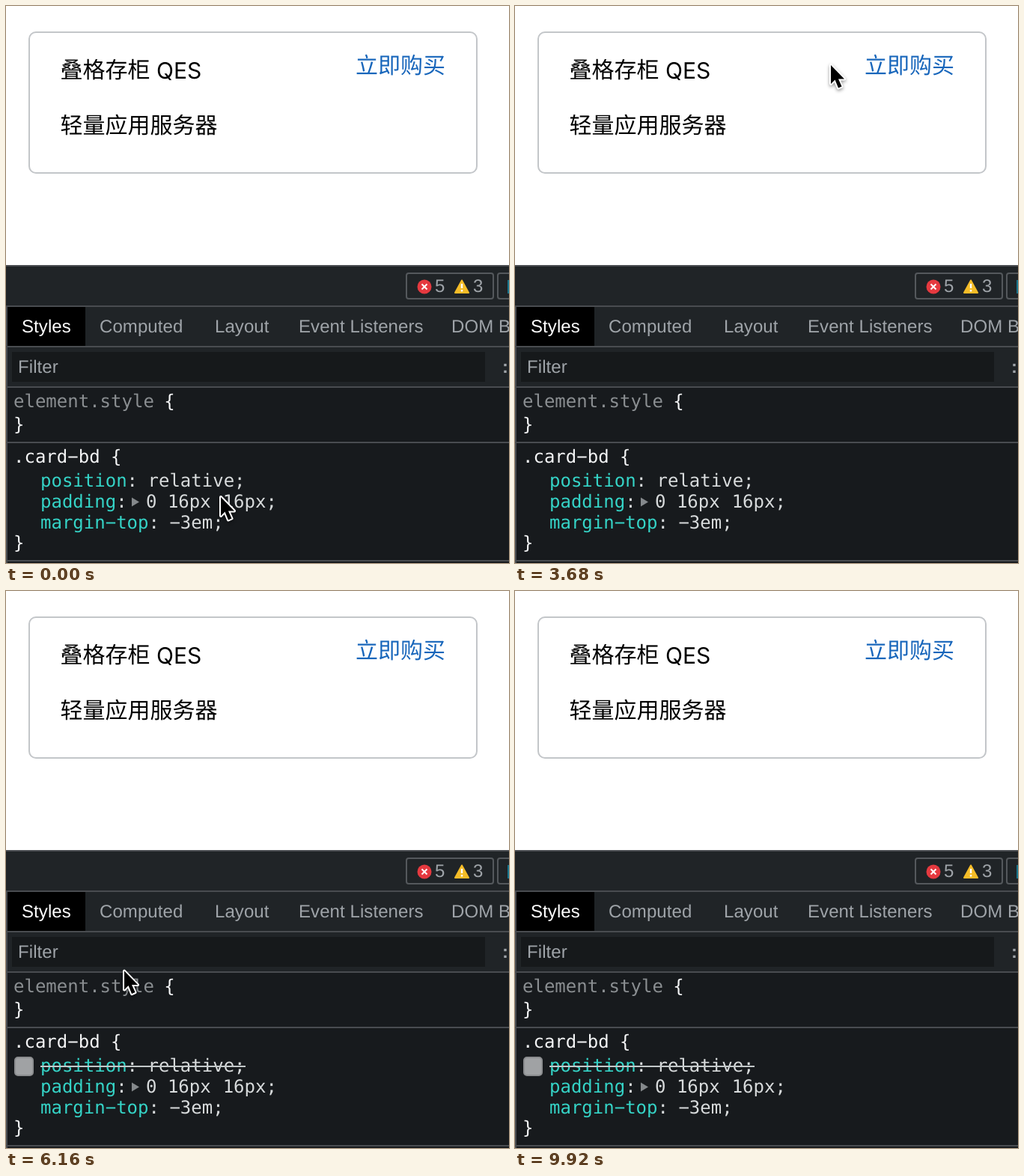
Recreate the animation shown at these times as an HTML page. Size 672x744 px, loop 10 s.

```html
<!DOCTYPE html>
<html lang="zh-CN">
<head>
<meta charset="utf-8">
<title>Card and style inspector</title>
<style>
  html, body { margin: 0; width: 100%; height: 100%; overflow: hidden; background: #fff; }
  svg { display: block; text-rendering: geometricPrecision; }
  .page { font: 30px Inter, "Noto Sans CJK SC", "Noto Sans CJK", sans-serif; }
  .ui { font: 24px "Liberation Sans", Arial, sans-serif; fill: #9fa4a9; letter-spacing: .08px; }
  .code { font: 24px "DejaVu Sans Mono", monospace; fill: #d8dbdc; }
  .prop { fill: #35d4c7; }
  .bright { fill: #f4f5f6; }
  .dim { fill: #8a8e91; }
  .line { fill: #494c50; }
</style>
</head>
<body>
<svg width="672" height="744" viewBox="0 0 672 744">
  <defs>
    <g id="checked">
      <rect x="11.5" y="-12.5" width="25" height="25" rx="4" fill="#7b5a35"/>
      <path d="M17 1l5 5 10-12" fill="none" stroke="#c8c9ca" stroke-width="3.5"/>
    </g>
  </defs>

  <g class="page">
    <rect x="31" y="35" width="598" height="188" rx="9" fill="#fff" stroke="#c3c6c9" stroke-width="2"/>
    <text x="72.5" y="96">叠格存柜</text>
    <text x="201" y="96.5">QES</text>
    <text x="72.5" y="170">轻量应用服务器</text>
    <text x="467" y="90" fill="#1866bb">立即购买</text>
  </g>

  <rect y="346" width="672" height="398" fill="#202427"/>
  <rect y="510" width="672" height="234" fill="#171a1d"/>
  <rect x="8" y="462" width="632" height="40" fill="#16191b"/>
  <g class="line">
    <rect y="346" width="672" height="2"/>
    <rect y="400" width="672" height="2"/>
    <rect y="454" width="672" height="2"/>
    <rect y="508" width="672" height="2"/>
    <rect y="582" width="672" height="2"/>
    <rect y="740" width="672" height="2"/>
    <rect y="402" width="2" height="342"/>
  </g>
  <rect x="2" y="402" width="104" height="52"/>

  <g fill="none" stroke="#54585c" stroke-width="2">
    <rect x="535" y="357" width="116" height="34" rx="3"/>
    <rect x="657" y="357" width="40" height="34" rx="3"/>
  </g>
  <rect x="670" y="366" width="2" height="18" fill="#17748c"/>
  <circle cx="559" cy="375" r="9.5" fill="#e5393f"/>
  <path d="M555.5 371.5l7 7m0-7l-7 7" stroke="#fff" stroke-width="2"/>
  <path d="M609 366.5l9 16.5h-18z" fill="#f4bc28" stroke="#f4bc28" stroke-width="2" stroke-linejoin="round"/>
  <path d="M609 371v6m0 2v2.5" stroke="#fff" stroke-width="2.4"/>

  <g class="ui">
    <text x="573" y="382">5</text>
    <text x="624" y="382">3</text>
    <text x="21" y="436" fill="#fff">Styles</text>
    <text x="125" y="436">Computed</text>
    <text x="279" y="436">Layout</text>
    <text x="391" y="436">Event Listeners</text>
    <text x="595" y="436">DOM B</text>
    <text x="16" y="490">Filter</text>
    <text x="663" y="490" font-weight="bold">:</text>
  </g>

  <g class="code">
    <text x="10" y="536"><tspan class="dim">element.style</tspan><tspan class="bright" dx="-1"> {</tspan></text>
    <text x="10" y="567" class="bright">}</text>
    <text x="10" y="610" class="bright">.card−bd {</text>
    <text x="46" y="642"><tspan class="prop">position</tspan>: <tspan dx="-1">relative;</tspan></text>
    <text x="46" y="670"><tspan class="prop">padding</tspan>:</text>
    <path d="M168 656.5l10 6-10 6z" fill="#85898c"/>
    <text x="187" y="670">0 16px <tspan dx="1.5">16px;</tspan></text>
    <text x="46" y="698"><tspan class="prop">margin−top</tspan>: <tspan dx="-1">−3em;</tspan></text>
    <text x="10" y="725" class="bright">}</text>
  </g>

  <g id="hoverBoxes">
    <use href="#checked" y="663"/>
    <use href="#checked" y="691"/>
  </g>
  <use id="positionOn" href="#checked" y="635"/>
  <g id="positionOff">
    <rect x="12" y="623" width="24" height="24" rx="4" fill="#a0a2a4" stroke="#8b8d8f" stroke-width="2"/>
    <rect x="46" y="634" width="274" height="2" fill="#c3c8c9"/>
  </g>

  <g id="cursor">
    <circle id="ring" cy="1" r="43" fill="none" stroke="#000" stroke-width="3"/>
    <path d="M0 0V25L5.5 19.5 10 30.5 14.5 28.5 10 18.5H18Z" stroke="#fff" stroke-width="4"
          stroke-linejoin="round" paint-order="stroke" style="filter:drop-shadow(0 2px 2px #0006)"/>
  </g>
</svg>
<script>
const LOOP = 10000, STEP = 80, UNCHECK_AT = 5040;

// Pointer path: time, x, y
const path = [
  [0, 287, 656], [160, 287, 656], [960, 536, 73], [1760, 536, 73],
  [2480, 532, 72], [3120, 532, 72], [3680, 422, 79], [4720, 31, 638],
  [5840, 31, 638], [6800, 521, 135], [7120, 521, 135], [7760, 530, 77],
  [9200, 530, 77], [9760, 710, 112], [LOOP, 710, 112]
];
const clicks = [[1200, 1440], [1760, 2000], [2400, 2640], [4960, 5200], [8480, 8720]];

const parts = Object.fromEntries(
  [...document.querySelectorAll("svg > [id], #ring")].map(el => [el.id, el]));
const show = (name, on) => parts[name].setAttribute("visibility", on ? "visible" : "hidden");

function pointerAt(t) {
  const i = path.findIndex(p => p[0] > t);
  const [t0, x0, y0] = path[i - 1], [t1, x1, y1] = path[i];
  const u = (t - t0) / (t1 - t0), k = u * u * (3 - 2 * u);
  return [x0 + (x1 - x0) * k, y0 + (y1 - y0) * k];
}

function draw(now) {
  const t = Math.floor(now % LOOP / STEP) * STEP;
  const [x, y] = pointerAt(t);
  const hover = t > 1000 && y > 583;
  const off = t >= UNCHECK_AT;
  parts.cursor.setAttribute("transform", `translate(${x} ${y})`);
  show("ring", clicks.some(([from, to]) => t >= from && t < to));
  show("hoverBoxes", hover);
  show("positionOn", hover && !off);
  show("positionOff", off);
  requestAnimationFrame(draw);
}
requestAnimationFrame(draw);
</script>
</body>
</html>
```
